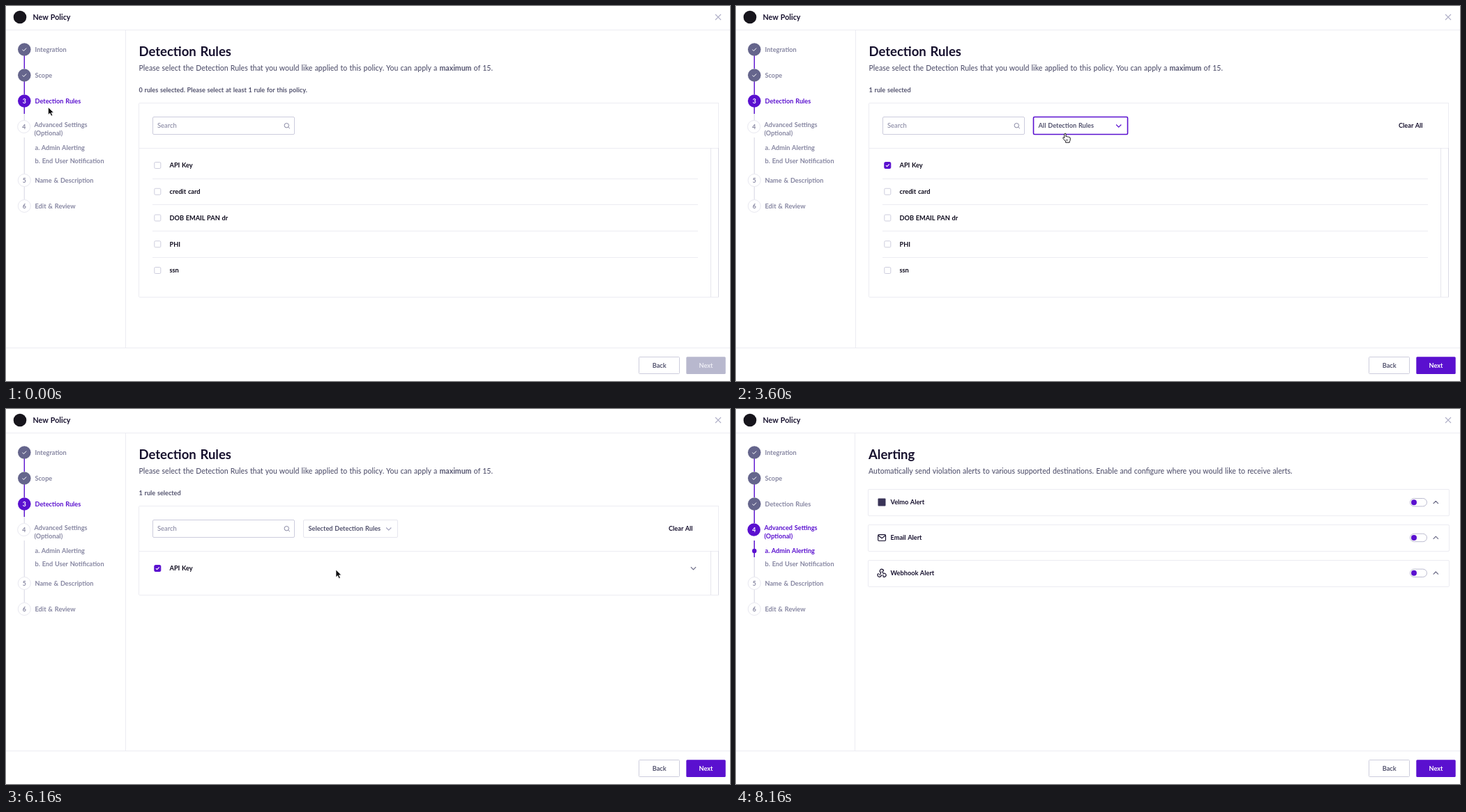
An HTML page for the animation above (8.56 s loop, 1038 by 539 pixels).

```html
<!DOCTYPE html>
<html lang="en">
<head>
<meta charset="utf-8">
<title>New Policy</title>
<style>
  html, body { margin: 0; width: 100%; height: 100%; overflow: hidden; background: #fff; }
  svg { display: block; width: 100vw; height: 100vh; font-family: Lato, "Open Sans", sans-serif; }
  text { word-spacing: .06em; }
  .edge { shape-rendering: crispEdges; }
</style>
</head>
<body>
<svg id="stage" viewBox="0 0 1038 539"></svg>
<script>
const LOOP = 8560, STEP = 80;
const CHECKED = 2800, OPENED = 4000, FILTERED = 6080, NEXT = 7840;
const purple = '#5a10cf', ink = '#17112e', slate = '#54546f', grey = '#8787a2',
      slot = '#cdcddd', rule = '#ececf2', done = '#65658c', tint = '#f0ecf9', arrow = '#6a6a86';

// Pointer hotspot: time, x, y
const path = [
  [0, 60.5, 145.5], [240, 60.5, 145.5], [1680, 334, 133], [1840, 334, 133],
  [2560, 217, 230], [3040, 217, 230], [3600, 472, 183], [3840, 472, 180],
  [4480, 472, 180], [5120, 473, 256], [5360, 473, 256], [5680, 473, 231],
  [6160, 473, 231], [6800, 305.5, 230.5], [7040, 305.5, 230.5], [7680, 1001, 512],
  [NEXT, 1001, 512], [8160, 1008, 546]
];

function pointerAt(t) {
  let i = 0;
  while (i < path.length - 2 && t >= path[i + 1][0]) i++;
  const [t0, x0, y0] = path[i], [t1, x1, y1] = path[i + 1];
  const u = Math.min(1, (t - t0) / (t1 - t0)), e = u * u * (3 - 2 * u);
  return [x0 + (x1 - x0) * e, y0 + (y1 - y0) * e];
}

// y is the middle of the capitals
const text = (x, y, s, fill = ink, size = 9.2, weight = 700, anchor = 'start') =>
  `<text x="${x}" y="${y + size * .36}" fill="${fill}" font-size="${size}" font-weight="${weight}" text-anchor="${anchor}">${s}</text>`;
const rect = (x, y, w, h, fill, stroke = 'none', r = 0, sw = 1) =>
  `<rect x="${x}" y="${y}" width="${w}" height="${h}" rx="${r}" fill="${fill}" stroke="${stroke}" stroke-width="${sw}"/>`;
const disc = (x, y, r, fill, stroke = 'none', sw = 1) =>
  `<circle cx="${x}" cy="${y}" r="${r}" fill="${fill}" stroke="${stroke}" stroke-width="${sw}"/>`;
const line = (d, stroke = rule, sw = 1, fill = 'none') =>
  `<path d="${d}" fill="${fill}" stroke="${stroke}" stroke-width="${sw}" stroke-linejoin="round"/>`;
const edge = (d, stroke = rule) => `<path class="edge" d="${d}" stroke="${stroke}"/>`;
const hline = (x, y, x2) => edge(`M${x} ${y}H${x2}`);
const vline = (x, y, y2, stroke) => edge(`M${x} ${y}V${y2}`, stroke);
const chevron = (x, y, dir, c) => line(`M${x - 3.6} ${y - 1.8 * dir}l3.6 ${3.6 * dir} 3.6 ${-3.6 * dir}`, c, 1.2);
const tick = (x, y, c, k = 1, sw = 1.2) =>
  line(`M${x - 2.8 * k} ${y + .1 * k}l${1.9 * k} ${1.9 * k} ${3.7 * k} ${-3.9 * k}`, c, sw);
const within = ([x, y], x0, y0, x1, y1) => x >= x0 && x <= x1 && y >= y0 && y <= y1;

const heading = (x, title, body) =>
  text(x, 65.5, title, ink, 18.5) + text(x, 89, body, slate, 10.5, 500);

function frameParts(alerting, ready) {
  return hline(0, 34.5, 1038) + vline(alerting ? 170.5 : 171.5, 35, 491) + hline(0, 491.5, 1038) +
    disc(20, 16, 9.3, '#17151c') + text(38.5, 16, 'New Policy', ink, 10.7) +
    line('M1017 12l8 8m0-8l-8 8', '#b0b0c8', 1.1) +
    rect(907.5, 504.5, 58, 24, '#fff', slot, 1) + text(936.7, 516.5, 'Back', slate, 9.2, 700, 'middle') +
    rect(975.3, 504.3, 56.4, 24.6, ready ? purple : '#b8b8ce', 'none', 1.5) +
    text(1003.5, 516.5, 'Next', ready ? '#fff' : '#ececf4', 9.2, 700, 'middle');
}

function sidebar(active) {
  const steps = [[62.5, 'Integration'], [99.5, 'Scope'], [136.5, 'Detection Rules'], [173.5],
    [250.5, 'Name &amp; Description'], [287.5, 'Edit &amp; Review']];
  const four = active === 4, mid = 26.3;
  const track = (y, y2, c = purple) => line(`M${mid} ${y}V${y2}`, c, 1.4);
  let s = track(71, 90) + track(108, 127) + track(145, 164, '#e0e0ea') +
    track(145, four ? 164 : 155) + track(189, 278, '#e0e0ea');
  if (four) s += track(189, 213) + disc(mid, 204, 3.2, purple);
  steps.forEach(([y, label], i) => {
    const n = i + 1, on = n === active, x = n === 4 ? mid - .6 : mid;
    s += n < active ? disc(x, y, 9.3, done) + tick(x, y, '#fff', 1, 1)
      : disc(x, y, on ? 9.3 : 9, on ? purple : '#fff', on ? 'none' : '#e8e8f0') +
        text(x, y, n, on ? '#fff' : grey, 8.8, 700, 'middle');
    if (label) s += text(41.5, y - .3, label, on ? purple : grey);
  });
  const c = four ? purple : grey;
  return s + text(40.5, 170.3, 'Advanced Settings', c) + text(40.5, 182.6, '(Optional)', c) +
    text(41.5, 204, 'a. Admin Alerting', c) + text(41.5, 222.7, 'b. End User Notification', grey);
}

function dropdown(t, p, open) {
  const hover = within(p, 427, 159, 562, 188), dy = open ? .7 : 0;
  const label = (t < FILTERED ? 'All' : 'Selected') + ' Detection Rules';
  let s = open ? rect(427.5, 160, 133.5, 26, tint, '#b9a3e3', 1, 2)
    : rect(426.5, 159.5, 135, 25, '#fff', hover ? purple : '#e6e6ee', 1.5, hover ? 1.6 : 1);
  s += text(433.5 + dy, 172 + dy, label, slate) +
    chevron(548.7, 172.3 + dy, open ? -1 : 1, open || hover ? purple : '#a5a5be');
  if (!open) return s;
  const drop = t < OPENED + 240 ? .5 : 0;
  s += rect(426, 191, 137, 95, '#00000009', 'none', 3) +
    rect(426.5, 190.5 + drop, 135, 93, '#fff', '#e3e3eb', 1.5);
  ['All', 'Selected', 'Unselected'].forEach((name, i) => {
    const y = 208.7 + 27.8 * i + drop, on = within(p, 430, y - 13.9, 558, y + 13.8);
    if (on) s += rect(430, y - 13.7, 128.5, 27.5, tint, 'none', 1.5);
    s += text(436.5, y, name + ' Detection Rules', on ? purple : slate);
  });
  return s + tick(546, 209 + drop, ink, 1.5, 1.4);
}

function rulesPage(t, p) {
  const checked = t >= CHECKED, open = t >= OPENED && t < FILTERED, dy = open ? 1.5 : 0;
  const rules = ['API Key', 'credit card', 'DOB EMAIL PAN dr', 'PHI', 'ssn'];
  const rows = t < FILTERED ? rules : rules.slice(0, 1);
  const top = 204.3 + dy, gap = 37.75, bottom = top + 25.3 + gap * rows.length;
  let s = heading(190.5, 'Detection Rules', 'Please select the Detection Rules that you would like applied to this policy. ' +
      'You can apply a <tspan font-weight="700">maximum</tspan> of 15.') +
    text(190.5, 121, checked ? '1 rule selected' : '0 rules selected. Please select at least 1 rule for this policy.', slate, 9.1) +
    edge(`M190.5 139.5H1022M190.5 ${bottom}H1022M190.5 139.5V${bottom}M1021.5 139.5V${top}`) +
    hline(191, top, 1022) + vline(1010.5, top, bottom, '#e6e6ed') + vline(1021.5, top, bottom, '#dcdce6') +
    rect(210.5, 159.5, 203, 25, '#fff', slot, 1.5) + text(217, 172, 'Search', grey, 9.4, 500) +
    disc(402.3, 171.7, 3.2, 'none', grey, 1) + line('M404.7 174l2.2 2.2', grey, 1);
  rows.forEach((name, i) => {
    const y = 229 + dy + gap * i, on = checked && !i;
    s += rect(212.8, y - 4.5, 9, 9, on ? purple : '#fff', on ? purple : slot, 1.5) +
      (on ? tick(217.3, y, '#fff', .85) : '') + text(234.5, y, name, '#0d0a1c');
    if (i < rows.length - 1) s += hline(210, y + 19, 992);
    if (!open && within(p, 191, y - 20, 1010, y + 18)) s += chevron(985.5, y, 1, arrow);
  });
  if (checked) s += text(950, 172 + dy / 2, 'Clear All') + dropdown(t, p, open);
  return s;
}

function alertPage() {
  let s = heading(190, 'Alerting', 'Automatically send violation alerts to various supported destinations. ' +
    'Enable and configure where you would like to receive alerts.');
  ['Velmo', 'Email', 'Webhook'].forEach((name, i) => {
    const y = 134.2 + 50.8 * i;
    s += rect(189.5, Math.round(y - 19) + .5, 833, 38, '#fff', rule, 1.5) + text(221.5, y - .2, name + ' Alert') +
      rect(966.5, y - 5.7, 24, 11.4, '#fff', '#bdbdd1', 5.7) + disc(972, y, 4, purple) +
      chevron(1003.3, y, -1, arrow);
  });
  return s + rect(203.5, 128.5, 11, 11, '#3a3458', 'none', 1) +
    rect(203.7, 180.7, 10.8, 8.8, 'none', ink, 1.2, 1.2) + line('M204 181.8l5.1 4 5.1-4', ink, 1.1) +
    line('M205.7 238.9l2.2-3.6a2.6 2.6 0 1 1 3.5-1.7M209.2 233l2 3.5a2.6 2.6 0 1 1-.6 4' +
      'M212.4 239h-4.2a2.6 2.6 0 1 1-3.6-2.6', ink, 1.2);
}

function pointer(t, p) {
  const alerting = t >= NEXT, open = t >= OPENED && t < FILTERED;
  const hand = within(p, 975, 504, 1032, 529) || !alerting && (within(p, 211, 222, 224, 236) ||
    t >= CHECKED && within(p, 427, 159, 562, open ? 284 : 188));
  const beam = !alerting && (within(p, 190, 52, 440, 138) || within(p, 210, 159, 413, 185));
  const shape = hand
    ? line('M-1.2.8q1.2-1.7 2.3 0v4q1.2-.8 2.1.3 1.2-.6 2 .5 1.8-.5 2 1.2v2.2q0 1.7-1 2.8v1.4h-5.6v-1.4l-3.5-4.3q-.9-1.6.5-1.8l1.2 1z', '#17151c', 1, '#fff') +
      line('M1.4 8.4v2.7m1.9-2.7v2.7', '#17151c', .7)
    : beam ? line('M-3-6q2.4 0 3 1.2.6-1.2 3-1.2M0-4.8v9.6M-3 6q2.4 0 3-1.2.6 1.2 3 1.2M-1.4.8h2.8', '#17151c', 1.2)
    : line('M0 0v10.8l2.5-2.3 1.8 4.1 2-.9-1.8-3.9h3.4z', '#fff', .7, '#0b0b0d');
  return `<g transform="translate(${p[0].toFixed(2)} ${p[1].toFixed(2)})">${shape}</g>`;
}

const stage = document.getElementById('stage');
let shown = -1;

function draw(now) {
  const t = Math.min(Math.floor(now % LOOP / STEP) * STEP, 8160);
  if (t !== shown) {
    shown = t;
    const p = pointerAt(t), alerting = t >= NEXT;
    stage.innerHTML = frameParts(alerting, t >= CHECKED) + sidebar(alerting ? 4 : 3) +
      (alerting ? alertPage() : rulesPage(t, p)) + pointer(t, p);
  }
  requestAnimationFrame(draw);
}
draw(0);
</script>
</body>
</html>
```
